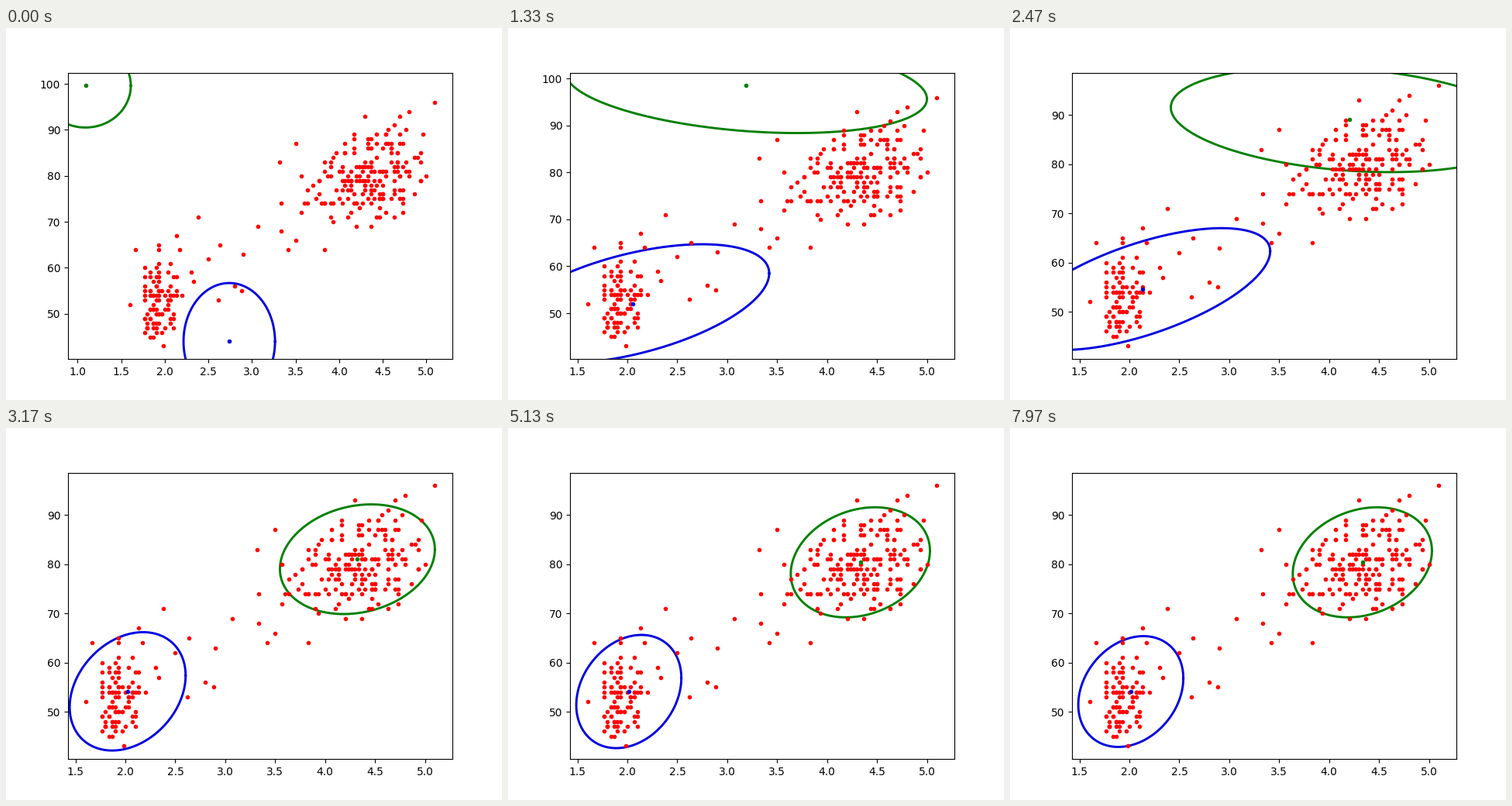
Animation, 640 px wide and 480 px high, one loop 8000 ms. Source, as a matplotlib script:

```python
import numpy as np
import matplotlib.pyplot as plt
from matplotlib.animation import FuncAnimation

FRAMES = 240
LOOP_MS = 8000
MID, LATE = 39, 74      # frames at which the drifting poses are reached
SETTLE = 8              # decay of the remaining error, in frames

# Pose: centre x, centre y, half width, half height, correlation
GREEN = dict(color="green", height_decay=SETTLE, poses=[
    (1.09, 99.6, 0.52, 9.1, 0.0),
    (3.19, 98.5, 1.81, 10.1, -0.28),
    (4.20, 89.1, 1.785, 10.7, -0.23),
    (4.333, 80.4, 0.697, 11.2, 0.21)])
BLUE = dict(color="#0000e0", height_decay=60, poses=[
    (2.74, 44.0, 0.525, 12.7, 0.0),
    (2.05, 52.0, 1.37, 12.7, 0.51),
    (2.13, 54.6, 1.28, 12.4, 0.62),
    (2.014, 54.1, 0.526, 11.2, 0.24)])

# Lone observations that set the limits and the gap between the groups
LONE = [(1.6, 52), (1.983, 43), (1.667, 64), (2.133, 67), (2.383, 71),
        (2.633, 65), (2.9, 63), (2.8, 56), (2.883, 55), (2.617, 53),
        (3.067, 69), (3.317, 83), (3.5, 87), (3.333, 74), (3.333, 68),
        (3.417, 64), (3.5, 66), (3.833, 64), (4.8, 94), (5.1, 96)]


def group(rng, count, x, y, x_range, y_range):
    """First draws inside a box, snapped to the recording grid."""
    x, y = np.round(x * 30) / 30, np.round(y)
    keep = ((x >= x_range[0]) & (x <= x_range[1])
            & (y >= y_range[0]) & (y <= y_range[1]))
    return np.column_stack([x, y])[keep][:count]


def make_data(n=800):
    rng = np.random.default_rng(7)
    x = 1.74 + rng.gamma(1.6, 0.15, n)
    y = 53.5 + 9 * (x - 1.98) + rng.normal(0, 5.5, n)
    short = group(rng, 92, x, y, (1.7, 2.5), (45, 65))
    x = rng.normal(4.33, 0.36, n)
    y = 80 + 4 * (x - 4.33) + rng.normal(0, 5.4, n)
    long = group(rng, 178, x, y, (3.55, 5.0), (69, 93))
    return np.vstack([LONE, short, long])


def hermite(a, b, slope_a, slope_b, span, u):
    return ((1 + 2 * u) * (1 - u) ** 2 * a + u * (1 - u) ** 2 * span * slope_a
            + u * u * (3 - 2 * u) * b + u * u * (u - 1) * span * slope_b)


def pose_at(frame, poses, height_decay):
    """Drift smoothly through three poses, then decay to the last one."""
    start, mid, late, final = np.array(poses)
    if frame >= LATE:
        decay = np.array([SETTLE, SETTLE, SETTLE, height_decay, SETTLE])
        return final + (late - final) * np.exp(-(frame - LATE) / decay)
    first, second = (mid - start) / MID, (late - mid) / (LATE - MID)
    same = first * second > 0
    turn = np.where(same, 2 * first * second
                    / np.where(same, first + second, 1), 0)
    if frame < MID:
        return hermite(start, mid, first, turn, MID, frame / MID)
    span = LATE - MID
    return hermite(mid, late, turn, second, span, (frame - MID) / span)


def padded(values):
    low, high = min(values), max(values)
    pad = 0.05 * (high - low)
    return low - pad, high + pad


plt.rcParams["font.family"] = "DejaVu Sans"
data = make_data()
angle = np.linspace(0, 2 * np.pi, 241)

fig, ax = plt.subplots(figsize=(6.4, 4.8), dpi=100)
ax.plot(data[:, 0], data[:, 1], ".", color="red")

clusters = []
for spec in (GREEN, BLUE):
    ring, = ax.plot([], [], color=spec["color"], lw=2.1, zorder=1.5)
    dot, = ax.plot([], [], ".", color=spec["color"], zorder=2.1)
    clusters.append((spec, ring, dot))


def update(frame):
    xs = [data[:, 0].min(), data[:, 0].max()]
    ys = [data[:, 1].min(), data[:, 1].max()]
    for spec, ring, dot in clusters:
        cx, cy, rx, ry, rho = pose_at(frame, spec["poses"],
                                      spec["height_decay"])
        ring.set_data(cx + rx * np.cos(angle),
                      cy + ry * (rho * np.cos(angle)
                                 + np.sqrt(1 - rho ** 2) * np.sin(angle)))
        dot.set_data([cx], [cy])
        xs.append(cx)
        ys.append(cy)
    ax.set_xlim(*padded(xs))
    ax.set_ylim(*padded(ys))
    return [artist for _, ring, dot in clusters for artist in (ring, dot)]


anim = FuncAnimation(fig, update, frames=FRAMES, interval=LOOP_MS / FRAMES,
                     init_func=lambda: update(0), repeat=True, repeat_delay=0)
plt.show()
```
